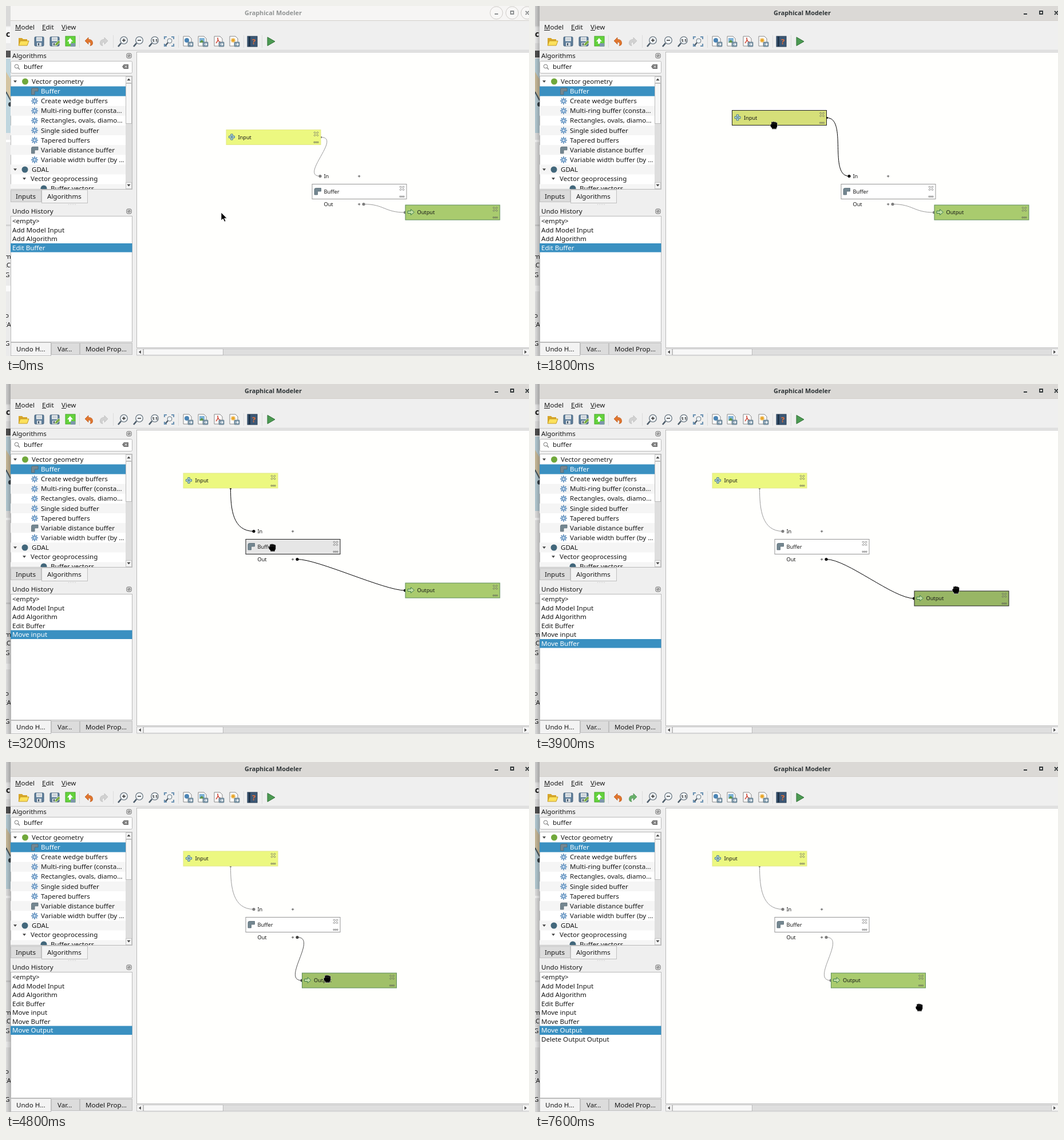
Write an HTML page that moves like this. It is 914x612 px and loops after 8000 ms.

```html
<!DOCTYPE html>
<html lang="en">
<head>
<meta charset="utf-8">
<title>Graphical Modeler</title>
<style>
  html, body { margin: 0; width: 100%; height: 100%; overflow: hidden; background: #efefef; }
  svg { display: block; width: 914px; height: 612px; }
  text { font: 11.55px "Noto Sans", "Open Sans", sans-serif; fill: #161616; white-space: pre; }
  .node text { font-size: 9.2px; }
  .title { font-size: 10.9px; font-weight: bold; text-anchor: middle; }
</style>
</head>
<body>
<svg id="stage" viewBox="0 0 914 612" xmlns="http://www.w3.org/2000/svg"></svg>
<script>
const BLUE = '#3a90c1';
const rect = (x, y, w, h, fill, extra = '') => `<rect x="${x}" y="${y}" width="${w}" height="${h}" fill="${fill}" ${extra}/>`;
const frame = (x, y, w, h, fill, stroke = '#b9b9b9', extra = '') =>
  rect(x + .5, y + .5, w - 1, h - 1, fill, `stroke="${stroke}" ${extra}`);
const path = (d, fill, extra = '') => `<path d="${d}" fill="${fill}" ${extra}/>`;
const stroke = (d, color, width = 1, extra = '') => path(d, 'none', `stroke="${color}" stroke-width="${width}" ${extra}`);
const circle = (x, y, r, fill, extra = '') => `<circle cx="${x}" cy="${y}" r="${r}" fill="${fill}" ${extra}/>`;
const at = (x, y, body, turn = 0) => `<g transform="translate(${x} ${y}) rotate(${turn})">${body}</g>`;
// y is the middle of the text line
const label = (x, y, s, extra = '') =>
  `<text x="${x}" y="${y + 4}" ${extra}>${s.replace(/</g, '&lt;').replace(/>/g, '&gt;')}</text>`;

function gear() {
  const teeth = [0, 45, 90, 135].map(a => `<path d="M0-6V6" transform="rotate(${a})" stroke="#6d97c0" stroke-width="2"/>`);
  return teeth.join('') + circle(0, 0, 3.8, '#7ba5cd') + circle(0, 0, 1.5, '#e4eef7');
}
const bufferIcon = path('M-5.5 6V-3Q-5.5-5.5-3-5.5H6V0H1Q0 0 0 1V6Z', '#748791', 'stroke="#55666f" stroke-width=".8"');
const floatIcon = frame(-4, -4, 9, 9, 'none', '#666', 'rx="2"') + circle(.5, .5, 2, 'none', 'stroke="#666"') + stroke('M-1 2L2-1', '#666');
const triangle = (x, y, turn) => at(x, y, path('M-3-1.8H3L0 2Z', '#444'), turn);

/* toolbar */
const disk = rect(-8, -8, 16, 16, '#5f7e9a', 'rx="1.5" stroke="#44607a"') + rect(-5, -7.5, 10, 7, '#f1f3f5') +
  stroke('M-4-5H4M-4-3H4', '#a9b4bd') + rect(-4, 2, 8, 6, '#d3d9de') + rect(-2, 3, 2, 4, '#456');
const lens = inner => stroke('M-3 3L-8 9', '#4a5a68', 2.6) + circle(2, -2, 6.3, '#f4f8fb', 'stroke="#6c7882" stroke-width="1.3"') + inner;
const sheet = mark => path('M-8-9H2L6-5V8H-8Z', '#fbfbfb', 'stroke="#888"') + mark +
  rect(0, 1, 9, 8, '#7d97aa', 'rx="1" stroke="#56707f" stroke-width=".7"') + stroke('M2 5H7M5 3L7 5L5 7', '#fff', 1.2);
const curl = 'M-7-1L-1-7V-3.5Q7-4 6.5 4Q6 7 2 7.5Q5 1 -1 1V5Z';
const corners = 'M-8-4V-8H-4M4-8H8V-4M8 4V8H4M-4 8H-8V4';

function toolbar() {
  const icons = [
    [31, path('M-9-6H-3L-1-4H6V7H-9Z', '#d6a52b') + path('M-6-1H9L6 7H-9Z', '#fce15c', 'stroke="#c49a23"')],
    [58, disk],
    [85, disk + path('M0 8L1 4L7-2L10 1L4 7Z', '#7bad41', 'stroke="#fff" stroke-width=".6"')],
    [112, rect(-8, -9, 17, 17, '#64d23c', 'stroke="#47a82a"') + path('M-5 0L0-6L5 0H2V4H-2V0Z', '#fff') + rect(1, 3, 8, 6, '#7d97aa')],
    [145, path(curl, '#e1762f', 'stroke="#b95717" stroke-width=".7"')],
    [204, lens(stroke('M-1-2H5M2-5V1', '#333', 1.5))],
    [231, lens(stroke('M-1-2H5', '#333', 1.5))],
    [258, lens('<text x="-2.8" y="1" style="font-size:7px;font-weight:bold">1:1</text>')],
    [285, circle(1, -1, 4, '#eef4f8', 'stroke="#6c7882"') + stroke('M-2 2L-7 8', '#4a5a68', 2.2) + stroke(corners, '#6c93b3', 2.2)],
    [318, sheet(circle(-2, -2, 4, '#4b84b5'))],
    [344, sheet(rect(-6, -6, 9, 8, '#7eb2d6') + path('M-6 2L-2-3L3 2Z', '#62954a'))],
    [372, sheet(stroke('M-5 3Q0-3-2-6Q-3-6 0 0L3 1', '#cf4030', 1.3))],
    [399, sheet(stroke('M-2-6V2M-6-2H2M-5-5L1 1M-5 1L1-5', '#e9a526', 1.4))],
    [431, rect(-9, -9, 17, 18, '#3c5876', 'stroke="#263d55"') + rect(-7, -9, 3, 18, '#1f344a') +
      '<text x="-1" y="5" style="font-size:13px;font-weight:bold;fill:#e97036">?</text>'],
    [463, path('M-6-7.5L7 0L-6 7.5Z', '#4c9a52', 'stroke="#317238"')]
  ];
  return icons.map(([x, body]) => at(x, 62, body)).join('') +
    at(171, 62, path(curl, '#d2d2d2', 'id="redo" stroke="#bbb" stroke-width=".7" transform="scale(-1 1)"')) +
    stroke('M128.5 51V73M187.5 51V73M301.5 51V73M415.5 51V73M447.5 51V73', '#dcdcdc');
}

/* left side */
function desktop() {
  const scraps = [['m', 438], ['LC', 453], ['G', 470], ['o', 541], ['EA', 557], ['G', 590]];
  return rect(0, 0, 8, 612, '#ebebeb') + rect(0, 0, 8, 35, '#d9d9d9') + rect(0, 37, 8, 28, '#f8f8f8') +
    rect(0, 78, 8, 12, '#555') + rect(0, 92, 8, 130, '#bfd6df') + path('M0 115L8 128V165L0 150Z', '#d4c5a3') +
    stroke('M0 150L8 165', '#4b5961', 2) + circle(8, 172, 4, '#38434a') + rect(0, 234, 8, 4, '#fff') +
    rect(0, 382, 8, 3, '#d4d4d4') + rect(0, 489, 8, 10, '#fafafa') +
    label(0, 50, 'c', 'style="font-size:14px;font-weight:bold"') +
    scraps.map(([s, y]) => label(s.length > 1 ? -5 : -2, y, s)).join('') +
    '<linearGradient id="shade"><stop stop-opacity=".06"/><stop offset="1" stop-opacity=".24"/></linearGradient>' +
    rect(0, 0, 8, 612, 'url(#shade)', 'id="shadow"');
}

function tree() {
  const names = ['Buffer', 'Create wedge buffers', 'Multi-ring buffer (consta...', 'Rectangles, ovals, diamo...',
    'Single sided buffer', 'Tapered buffers', 'Variable distance buffer', 'Variable width buffer (by ...'];
  let out = frame(8, 122, 213, 199, '#fff') + '<clipPath id="treeClip"><path d="M8 123H209V320H8Z"/></clipPath><g clip-path="url(#treeClip)">';
  for (let i = 1; i < 12; i += 2) out += rect(8, 123.4 + i * 17.1, 201, 17.1, i === 1 ? BLUE : '#f5f5f5');
  out += triangle(16, 132, 0) + circle(33.5, 132, 5.5, '#70a83b') + label(45, 132, 'Vector geometry');
  names.forEach((name, i) => {
    const y = 149 + i * 17.14;
    out += at(50, y, i === 0 || i === 6 ? bufferIcon : gear()) + label(61, y, name, i ? '' : 'style="fill:#fff"');
  });
  return out + triangle(16, 286, 0) + circle(33, 286, 5.5, '#42677b') + label(45, 286, 'GDAL') +
    triangle(32, 302, 0) + label(43, 302, 'Vector geoprocessing') +
    circle(66, 319, 5.5, '#42677b') + label(78, 319, 'Buffer vectors') + '</g>' +
    rect(209, 123, 11, 197, '#dedede') + frame(209, 123, 11, 12, '#f4f4f4', '#c5c5c5') +
    frame(209, 135, 11, 71, '#f7f7f7', '#bbb') + frame(209, 308, 11, 12, '#f4f4f4', '#c5c5c5') +
    triangle(214.5, 128.5, 180) + triangle(214.5, 313.5, 0);
}

const tab = (x, y, w, h, s, pad, active) => frame(x, y, w, h, active ? '#f3f3f3' : '#dcdcdc', '#c0c0c0') + label(x + pad, y + h / 2, s);

function panels() {
  return label(11, 87, 'Algorithms') + at(214.5, 86.5, floatIcon) +
    frame(8, 96, 213, 22, '#fff', '#b9b9b9', 'rx="2"') +
    circle(18.5, 105.5, 3.3, 'none', 'stroke="#777"') + stroke('M21 108L24 111', '#777', 1.3) + label(31, 106, 'buffer') +
    path('M203 106L206 102H214V110H206Z', '#777') + stroke('M207.5 104L211.5 108M211.5 104L207.5 108', '#fff') + tree() +
    tab(8, 322, 54, 21, 'Inputs', 9, false) + tab(62, 321, 81, 24, 'Algorithms', 10, true) +
    stroke('M109 347H122', '#bbb', 1, 'stroke-dasharray="1 2"') +
    label(11, 359, 'Undo History') + at(214.5, 358.5, floatIcon) + frame(8, 367, 213, 221, '#fff') +
    rect(8, 0, 212.5, 15.5, BLUE, 'id="picked"') +
    history.map(([, name], i) => label(11, rowY(i), name, 'class="entry"')).join('') +
    tab(79, 589, 50, 21, 'Var...', 11, false) + tab(129, 589, 92, 21, 'Model Prop...', 10, false) + tab(8, 588, 71, 24, 'Undo H...', 10, true);
}

const history = [[0, '<empty>'], [0, 'Add Model Input'], [0, 'Add Algorithm'], [0, 'Edit Buffer'], [2100, 'Move input'],
  [3300, 'Move Buffer'], [4700, 'Move Output'], [6200, 'Delete Output Output']];
const rowY = i => 376 + i * 15.5;

/* window */
function windowChrome() {
  const rings = [857, 884.5, 911].map(x => circle(x, 12, 11, '#f8f7f6', 'stroke="#cfccc8"')).join('');
  return rect(8, 0, 906, 612, '#efefef') + rect(8, 0, 906, 26, '#f6f5f4', 'id="bar"') + stroke('M8 25.5H914', '#d2cfcb') +
    `<g id="rings">${rings}</g>` +
    '<g id="buttons" fill="none" stroke-width="1.8"><path d="M854 14H860M882 9H887V14H882ZM908 9L914 15M914 9L908 15"/></g>' +
    '<text id="title" class="title" x="467" y="16">Graphical Modeler</text>' +
    [[16, 'Model', 10], [63, 'Edit', 7], [97, 'View', 8]].map(([x, s, w]) =>
      label(x, 36.5, s) + stroke(`M${x} 42.5h${w}`, '#222')).join('') +
    toolbar() + stroke('M8 77.5H914', '#cacaca');
}

function canvasArea() {
  return frame(228, 80, 690, 518, '#fffffd', '#b9b9b9') + rect(228, 598, 686, 14, '#efefef') +
    frame(228, 599, 690, 12, '#dedede', '#c4c4c4') + frame(228, 599, 12, 12, '#f4f4f4', '#c4c4c4') +
    frame(240, 599, 140, 12, '#f7f7f7', '#bbb') + frame(902, 599, 14, 12, '#f4f4f4', '#c4c4c4') +
    triangle(234, 605, 90) + triangle(908, 605, -90);
}

/* model nodes */
const cross = 'M-4-2.5L-2.5-4L0-1.5L2.5-4L4-2.5L1.5 0L4 2.5L2.5 4L0 1.5L-2.5 4L-4 2.5L-1.5 0Z';
const dots = [-3, 0, 3].map(x => circle(x, 0, 1.2, 'none', 'stroke="#555" stroke-width=".7"')).join('');
const node = (id, name, icon, extra = '') => `<g id="${id}" class="node">` +
  '<rect class="body" x=".5" y=".5" width="165" height="26"/>' + at(10, 13, icon) +
  `<text x="21" y="16.5">${name}</text>` +
  at(157.5, 7.8, stroke(cross, '#666', .8)) + at(157.5, 22.3, dots) + extra + '</g>';

const plus = path('M-1.7-5H1.7V-1.7H5V1.7H1.7V5H-1.7V1.7H-5V-1.7H-1.7Z', '#d8edf0', 'stroke="#3d7485"') + stroke('M0-3V3M-3 0H3', '#3d7485');
const arrow = path('M-5.5-2H0V-5L6 0L0 5V2H-5.5Z', '#c3dfa4', 'stroke="#3e7d4b"');
const ports = '<text x="21" y="-9.7">In</text><text x="80" y="-9.7">+</text><text x="21" y="39">Out</text><text x="80" y="39">+</text>';
const closeHover = rect(150, 1, 15, 15, 'rgba(55,55,55,.13)', 'id="closeHover" stroke="#333" stroke-width=".7"');

const handShape = 'M-6 0Q-6-2-4-2V-5Q-3-7-1.5-5.5Q0-8 1.3-5.5Q3-7 4-5Q6-6 6.5-3.5V2Q6 4 5 5V7H-3V5Q-6 3-6 0Z';
const hand = path(handShape, '#000', 'stroke="#fff" stroke-width=".5"') + stroke('M-1.5-4V-1.5M1.3-4V-1.5M4-4V-1.5', '#777', .5) + stroke('M-2.5 6H4.5', '#888', .6);
const pointer = path('M0 0V14L3.3 11L5.8 16.3L8 15.2L5.6 10.2H10Z', '#000', 'stroke="#fff" stroke-width=".8"');

const stage = document.getElementById('stage');
stage.innerHTML = desktop() + windowChrome() + panels() + canvasArea() +
  '<g id="links"></g>' + node('input', 'Input', plus) + node('buffer', 'Buffer', bufferIcon, ports) +
  node('output', 'Output', arrow, closeHover) + `<g id="pointer">${pointer}</g><g id="hand">${hand}</g>`;
const el = id => document.getElementById(id);
const entries = [...document.querySelectorAll('.entry')];

/* motion: [time, x, y] */
const tracks = {
  input: [[1500, 384.5, 216], [1700, 366, 199], [1900, 322, 165], [2000, 309.5, 155.5]],
  buffer: [[2700, 534.5, 311], [2900, 497, 302], [3100, 429, 275], [3200, 418.5, 271]],
  output: [[3700, 697.5, 347.5], [3800, 690, 350], [3900, 662.5, 361.5], [4100, 603, 378], [4300, 545, 383], [4400, 527, 377], [4500, 517, 368.5]],
  cursor: [[500, 376, 361], [700, 383, 350], [1200, 440, 247], [1400, 448, 231], [1500, 450, 237], [1700, 438, 226], [1900, 396, 191], [2000, 377, 178],
    [2100, 378, 179], [2200, 387, 186], [2300, 453, 245], [2400, 545, 310], [2500, 545, 310], [2600, 575, 324], [2700, 581, 326],
    [2900, 550, 319], [3100, 480, 292], [3200, 465, 286], [3300, 492, 293], [3400, 712, 352], [3500, 739, 357], [3800, 742, 358],
    [3900, 735, 360], [4200, 620, 391], [4400, 589, 393], [4600, 561, 379], [5200, 561, 379], [5400, 590, 381], [5700, 672, 380],
    [5800, 676, 379], [5900, 676, 379], [6000, 677, 378], [6600, 677, 378], [6700, 676, 388], [6900, 671, 429]]
};
function place(track, t) {
  const next = track.findIndex(k => k[0] > t);
  if (next < 0) return track[track.length - 1].slice(1);
  if (!next) return track[0].slice(1);
  const a = track[next - 1], b = track[next], f = (t - a[0]) / (b[0] - a[0]);
  return [a[1] + (b[1] - a[1]) * f, a[2] + (b[2] - a[2]) * f];
}

// state changes: 0 idle, 1 hovered, 2 grabbed
const states = {
  input: [[1300, 1], [1600, 2], [2100, 1], [2300, 0]],
  buffer: [[2600, 1], [2700, 2], [3300, 1], [3400, 0]],
  output: [[3400, 1], [3700, 2], [4700, 1], [6200, 0]]
};
const stateAt = (id, t) => states[id].reduce((s, [time, v]) => t >= time ? v : s, 0);
const fills = { input: ['#ecf880', '#e0ea7f', '#d6df79'], buffer: ['#ffffff', '#f2f2f2', '#e6e6e6'], output: ['#a9cb6e', '#a0c069', '#98b665'] };
const edges = { input: '#e3e78a', buffer: '#969696', output: '#5c8c5a' };
const inks = ['#9a9a9a', '#505050', '#000'];
const knobs = ['#7d7d7d', '#404040', '#000'];

// nearest side of a node, with the outward direction of that side
function nearestSide([x, y], [px, py]) {
  const sides = [[x, y + 13.5, -1, 0], [x + 166, y + 13.5, 1, 0], [x + 83, y, 0, -1], [x + 83, y + 27, 0, 1]];
  const distance = s => Math.hypot(s[0] - px, s[1] - py);
  return sides.reduce((a, b) => distance(b) < distance(a) ? b : a);
}
function link(side, port, dir, state, nodeKnob) {
  const reach = 36.5, [x, y, dx, dy] = side, [px, py] = port;
  return stroke(`M${x} ${y}C${x + dx * reach} ${y + dy * reach} ${px + dir * reach} ${py} ${px} ${py}`, inks[state]) +
    circle(px, py, 2.6, knobs[state]) + nodeKnob(x, y, knobs[state]);
}

function draw(ms) {
  const t = Math.floor(ms / 100) * 100;
  const pos = {}, state = {};
  const show = (id, on) => { el(id).style.display = on ? '' : 'none'; };
  const move = (id, [x, y]) => el(id).setAttribute('transform', `translate(${x} ${y})`);
  for (const id of ['input', 'buffer', 'output']) {
    pos[id] = place(tracks[id], t);
    state[id] = stateAt(id, t);
    move(id, pos[id]);
    const body = el(id).querySelector('.body');
    body.setAttribute('fill', fills[id][state[id]]);
    body.setAttribute('stroke', state[id] === 2 ? '#222' : edges[id]);
  }
  const hasOutput = t < 6200 || t >= 7600;
  show('output', hasOutput);
  show('closeHover', t >= 5700 && t < 6200);

  const [bx, by] = pos.buffer, inPort = [bx + 14.5, by - 13.5], outPort = [bx + 90.5, by + 35.5];
  let links = link(nearestSide(pos.input, inPort), inPort, -1, Math.max(state.input, state.buffer),
    (x, y, c) => rect(x - 1.5, y - 1.5, 3, 3, c));
  if (hasOutput) links += link(nearestSide(pos.output, outPort), outPort, 1, Math.max(state.output, state.buffer),
    (x, y, c) => circle(x, y, 2.5, c));
  el('links').innerHTML = links;

  const active = t >= 1500;
  el('bar').setAttribute('fill', active ? '#dbd9d6' : '#f6f5f4');
  el('title').style.fill = active ? '#2e3436' : '#929595';
  el('buttons').setAttribute('stroke', active ? '#2e3436' : '#8b8e8f');
  show('rings', !active);
  show('shadow', active);
  show('pointer', !active);
  show('hand', active);
  move(active ? 'hand' : 'pointer', place(tracks.cursor, t));

  const undone = t >= 7600;
  const last = history.filter(([time]) => t >= time).length - 1;
  const picked = undone ? last - 1 : last;
  el('picked').setAttribute('y', rowY(picked) - 7.5);
  entries.forEach((entry, i) => {
    entry.style.display = i <= last ? '' : 'none';
    entry.style.fill = i === picked ? '#fff' : '';
  });
  el('redo').setAttribute('fill', undone ? '#69b06b' : '#d2d2d2');
  el('redo').setAttribute('stroke', undone ? '#468d4b' : '#bbb');
}

const start = performance.now();
function tick() {
  draw((performance.now() - start) % 8000);
  requestAnimationFrame(tick);
}
tick();
</script>
</body>
</html>
```
